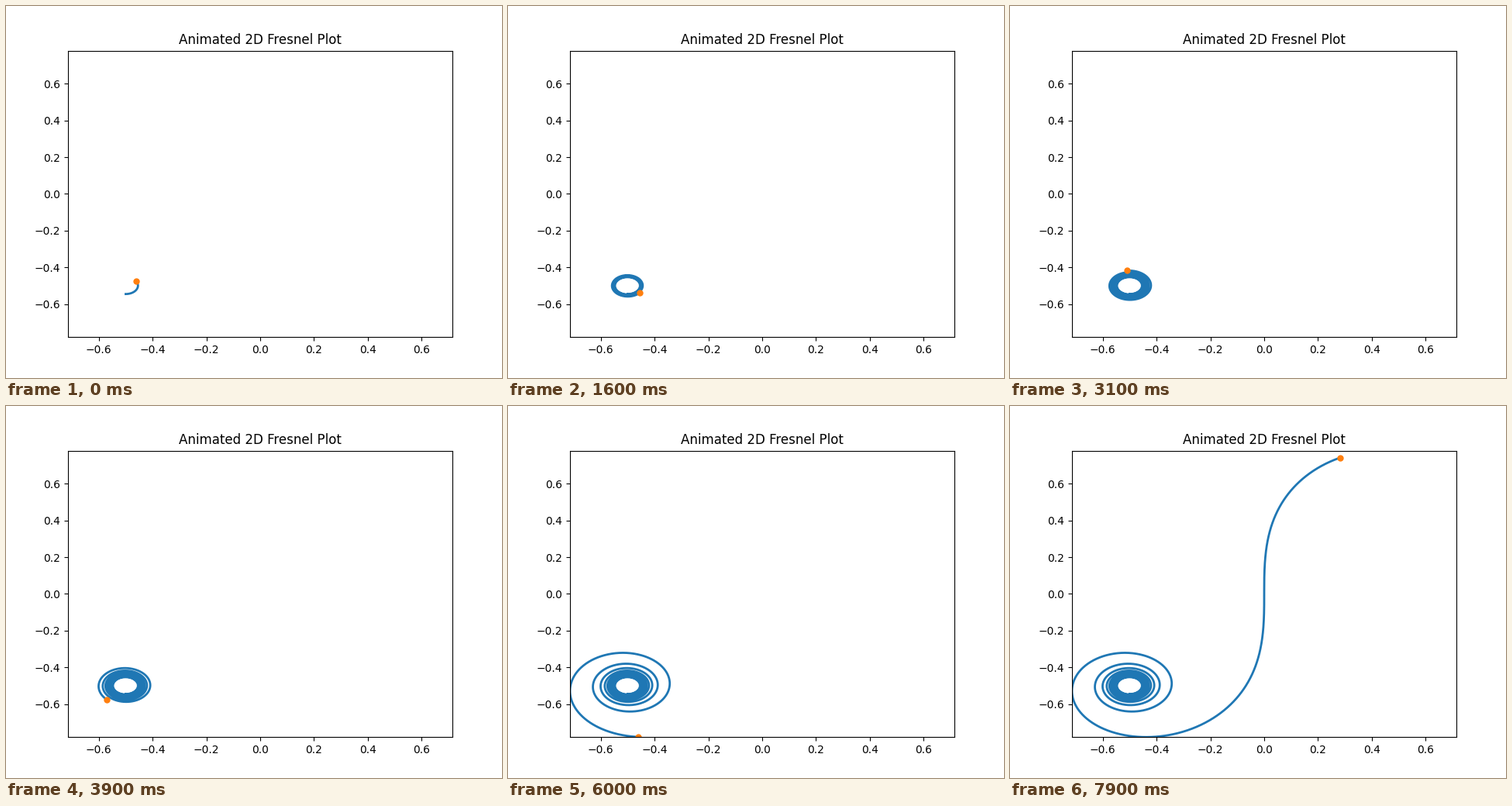
Animation of 640x480 px, one loop 8000 ms. Source, as a matplotlib script:

```python
import numpy as np
import matplotlib.pyplot as plt
from matplotlib.animation import FuncAnimation

FRAMES = 80
INTERVAL = 100
STEP = 35  # curve points added per frame


def odd_integral(values, t):
    """Cumulative trapezoid integral of an even function, zero at t = 0."""
    areas = (values[1:] + values[:-1]) / 2 * np.diff(t)
    total = np.concatenate(([0], np.cumsum(areas)))
    return total - total[-1] / 2


t = np.linspace(-7, 7, 5000)
phase = np.pi * t**2 / 2
x = odd_integral(np.sin(phase), t)
y = odd_integral(np.cos(phase), t)

fig, ax = plt.subplots(figsize=(6.4, 4.8), dpi=100)
ax.set_title("Animated 2D Fresnel Plot")
ax.set_xlim(x.min(), x.max())
ax.set_ylim(y.min(), y.max())
curve, = ax.plot([], [], lw=2, color="C0")
dot, = ax.plot([], [], "o", ms=5, color="C1")


def update(frame):
    end = STEP * (frame + 1)
    curve.set_data(x[:end], y[:end])
    dot.set_data(x[end - 1:end], y[end - 1:end])
    return curve, dot


anim = FuncAnimation(fig, update, frames=FRAMES, interval=INTERVAL, repeat=True)
plt.show()
```
